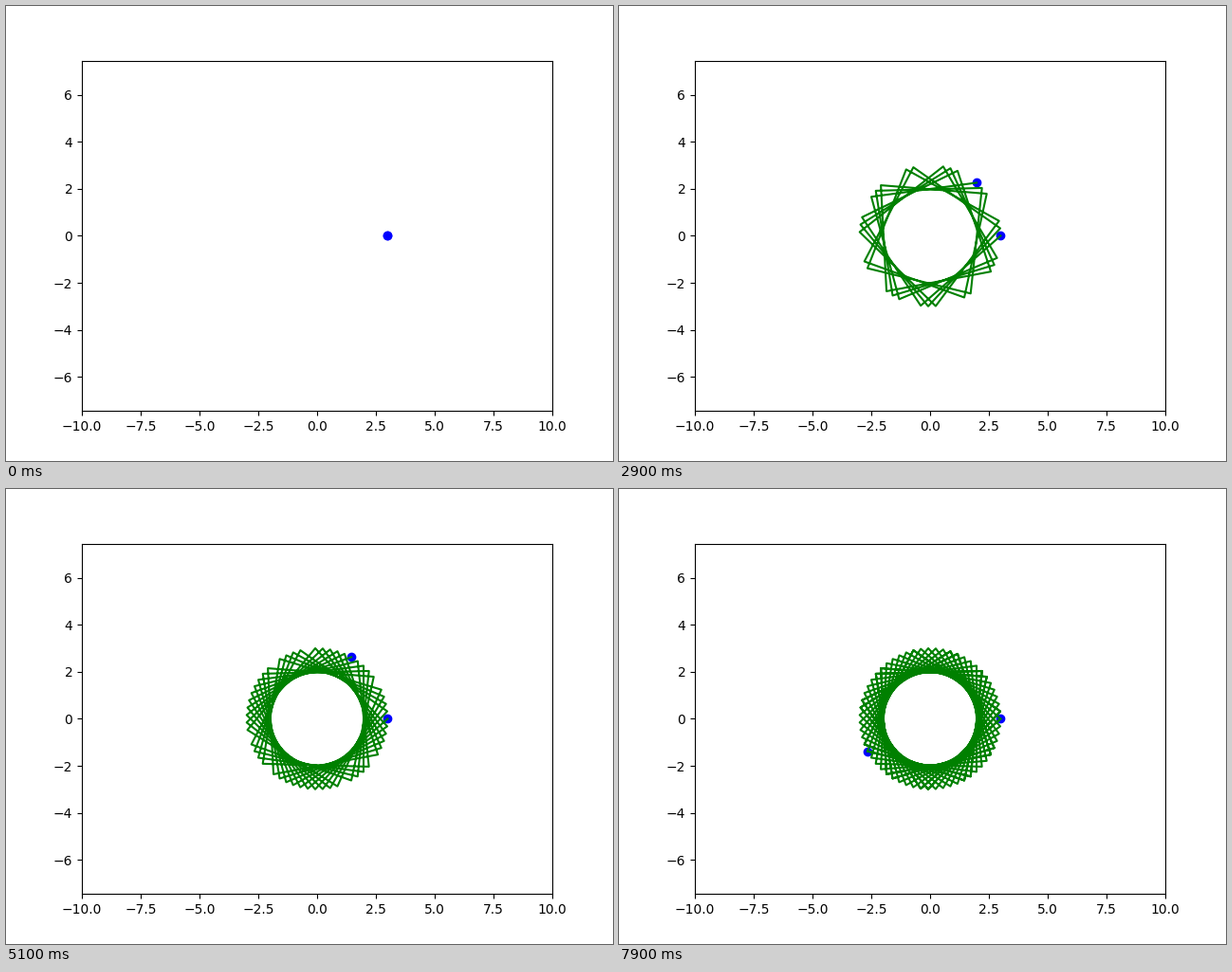
Recreate the animation shown at these times as a matplotlib script. Size 640 by 480 pixels, loop 8 s.

```python
import numpy as np
import matplotlib.pyplot as plt
from matplotlib.animation import FuncAnimation

FRAMES = 80
INTERVAL = 100
RADIUS = 3
SLOPE = 7 / 8  # direction of the first chord

# A ball bouncing inside a circle turns by the same angle at every hit.
turn = 2 * np.arctan(SLOPE) - np.pi
angles = turn * np.arange(FRAMES)
xs, ys = RADIUS * np.cos(angles), RADIUS * np.sin(angles)

fig, ax = plt.subplots(figsize=(6.4, 4.8), dpi=100)
half_height = 10 * (0.77 * 480) / (0.775 * 640)  # equal scale on both axes
ax.set_xlim(-10, 10)
ax.set_ylim(-half_height, half_height)

ax.plot(xs[:1], ys[:1], "bo")
ball, = ax.plot(xs[:1], ys[:1], "bo")
trail, = ax.plot([], [], "g-")


def update(i):
    ball.set_data(xs[i:i + 1], ys[i:i + 1])
    trail.set_data(xs[:i + 1], ys[:i + 1])
    return ball, trail


anim = FuncAnimation(fig, update, frames=FRAMES, interval=INTERVAL,
                     init_func=lambda: update(0), repeat=True, repeat_delay=0)
plt.show()
```
